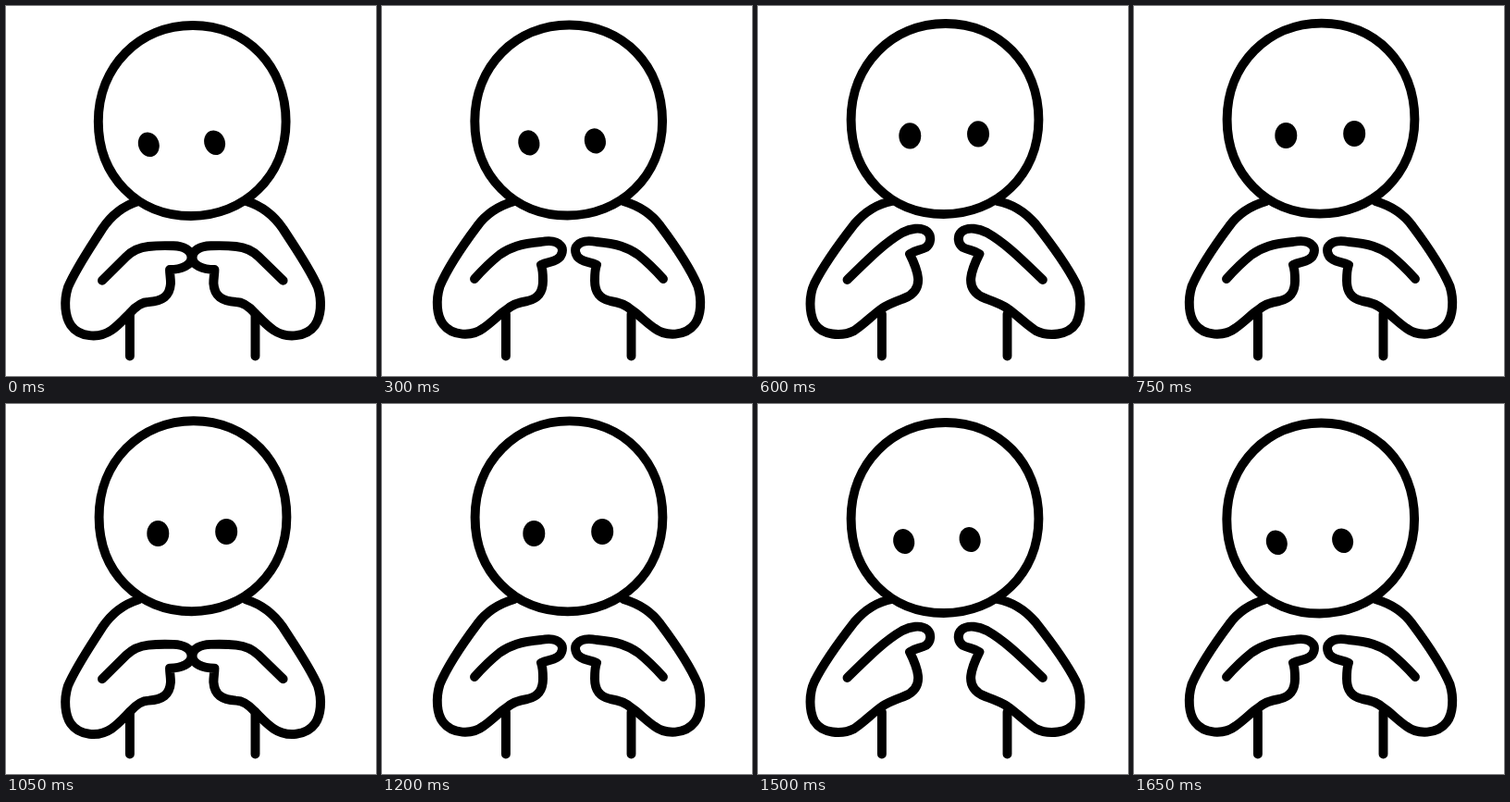
These frames come from a looping animation (400x400 px, 1.8 s). An HTML page:

```html
<!DOCTYPE html>
<html lang="en">
<head>
<meta charset="utf-8">
<title>Shy fingers</title>
<style>
  html, body { margin: 0; width: 100%; height: 100%; overflow: hidden; background: #fff; }
  svg { display: block; width: 100%; height: 100%; }
  .line { fill: none; stroke: #000; stroke-width: 9.9; stroke-linecap: round; stroke-linejoin: round; }
</style>
</head>
<body>
<svg viewBox="0 0 400 400">
  <path class="line" d="M133.9 333V378.5M269.5 333V378.5"/>
  <g id="arms">
    <path id="left" class="line"/>
    <path id="right" class="line"/>
  </g>
  <g id="head">
    <path class="line" style="fill:#fff" d="M202 21C260 21 302.6 65 302.6 125C302.6 185 256.5 227 200 227C142 227 99.8 184 99.8 125C99.8 65.5 144 21 202 21Z"/>
  </g>
  <ellipse id="eyeL"/>
  <ellipse id="eyeR"/>
</svg>
<script>
const STEP = 150, LOOP = 1800;
const $ = id => document.getElementById(id);

// Left arm outline, plus the mirror for the right arm: x -> tipR - k * (x - tipL)
const touch = {
  d: 'M143 211C127 216 114 226 104 241C92 260 76 283 67 304C62 320 64 336 70 345C79 358 100 360 114 350.5C122 345 128 338 134 332C141 324 147 320 154 320C169 319 177 314 178 300C178 294 177 290 177 285C190 285 200.5 280 200.5 272C200.5 264 192 259.5 181 259.3C172 259 163 259 154 260C144 261 136 265 130 271L104 296.7',
  tipL: 201, tipR: 201, k: 1.016
};
const near = {
  d: 'M143 211C126 216 113 224 103 238C88 258 71 283 62.5 303C58 318 59 335 66 344C76 357 97 358 110 348C120 341 127 333 135 328C142 322 150 320 157 319C170 316 174 308 174 297C174 290 174 285 172 280C178 277 184 277 189 274C196 270 196 262 193 259C189 254 180 253.5 172 255C150 257 138 261 127 269C117 277 108 286 100 295',
  tipL: 199, tipR: 205, k: 1
};
const ELBOW = 'M145 211C128 214 115 223 104 236C90 254 70 282 61 300C55 313 55 331 61 343C69 356 90 358 104 351C116 343 125 333 134 327C141 322 150 319 158 316';
const apart = {
  d: ELBOW + 'C169 312 174 305 173 295C172.5 286 169 279 165.5 271C172 268 179 267 183.5 264C190 260 190 252 185.5 248C179 243 170 244 160 248C137 257 117 275 97 296',
  tipL: 192, tipR: 210.5, k: 1.018
};
const wide = {
  d: ELBOW + 'C169 312 174 304 173 294C172 284 168 276 164 268C170 264 176 264 181.5 261C187 257 188 249 183 244C176 238 164 241 156 245C135 257 116 277 96.5 296',
  tipL: 189, tipR: 214, k: 1.014
};
const press = { ...touch, dy: 0.6 };

const arms = [touch, press, near, apart, wide, near];
const gaze = [0, 0.1, 0.3, 0.78, 0.97, 1, 1, 1, 1, 0.75, 0.22, 0];
const lift = [0, 0, 0.5, 1, 2, 2.4, 2.7, 2.8, 2.6, 2, 1, 0.5];

function setEye(el, x, y, u) {
  const tilt = -20 * (1 - u);
  el.setAttribute('rx', 11.2 + 0.8 * u);
  el.setAttribute('ry', 13.5 + 0.6 * u);
  el.setAttribute('transform', `translate(${x} ${y}) rotate(${tilt})`);
}

function draw(ms) {
  const i = Math.floor((ms % LOOP) / STEP);
  const arm = arms[i % arms.length];
  $('left').setAttribute('d', arm.d);
  $('right').setAttribute('d', arm.d);
  $('right').setAttribute('transform', `matrix(${-arm.k} 0 0 1 ${arm.tipR + arm.k * arm.tipL} 0)`);
  $('arms').setAttribute('transform', `translate(0 ${arm.dy || 0})`);

  const u = gaze[i];
  const sway = Math.min(0.8, lift[i]);
  $('head').setAttribute('transform', `translate(${sway} ${-lift[i]})`);
  const x = 154.3 + 10 * Math.sin(u * Math.PI / 2);
  const y = 149.7 - 9.7 * u ** 1.4;
  setEye($('eyeL'), x, y, u);
  setEye($('eyeR'), x + 71.3 + 2.6 * u * u, y - 2, u);
}

const start = performance.now();
function tick() {
  draw(performance.now() - start);
  requestAnimationFrame(tick);
}
draw(0);
requestAnimationFrame(tick);
</script>
</body>
</html>
```
